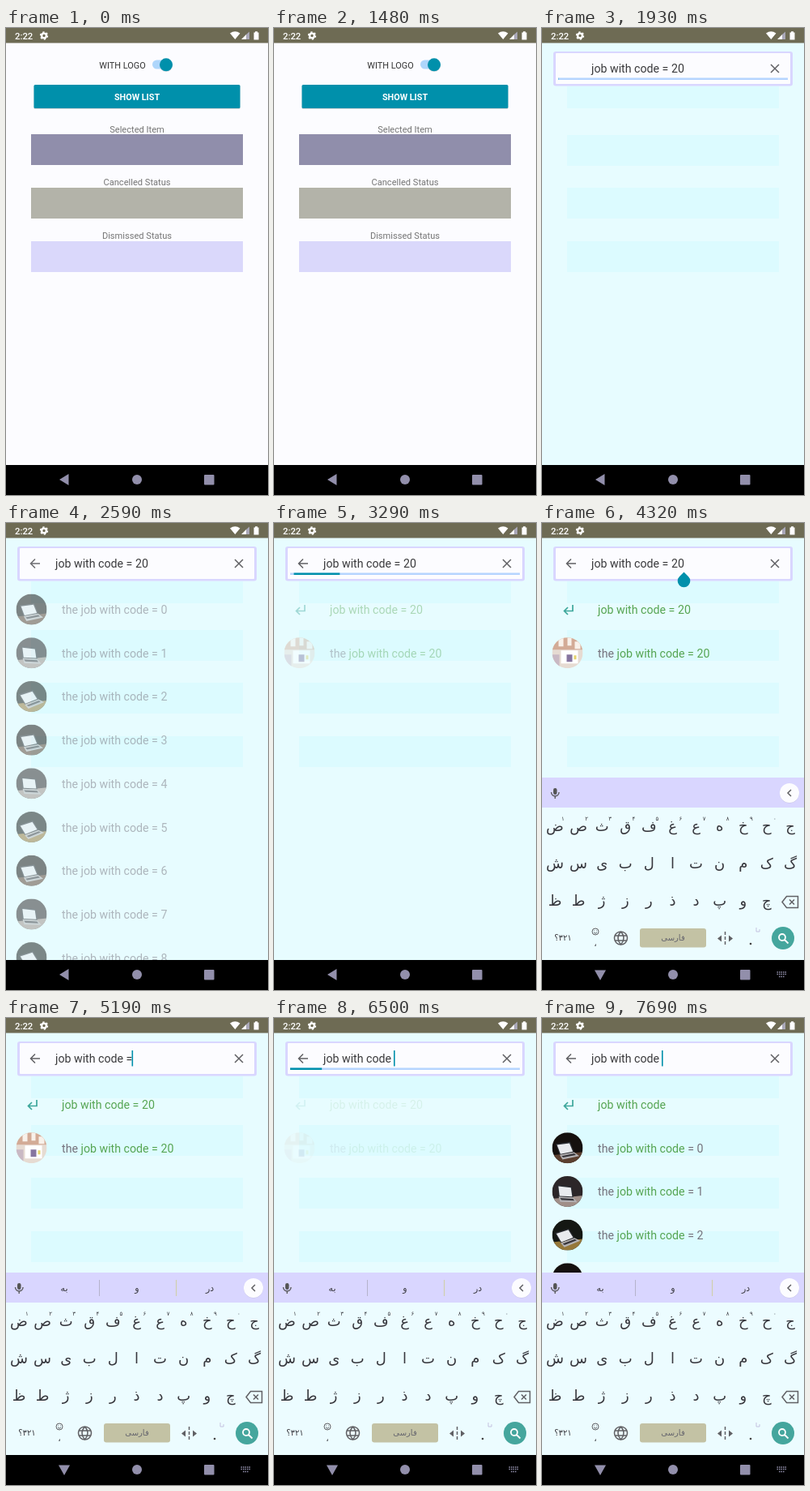
Animation of 324 by 576 pixels, one loop 8000 ms. Source, as an HTML page:

```html
<!DOCTYPE html>
<html lang="en">
<head>
<meta charset="utf-8">
<title>Search list dialog</title>
<style>
  html, body { margin: 0; width: 100%; height: 100%; overflow: hidden; background: #fcfcff; }
  svg { display: block; width: 100%; height: 100%; }
  text { font-family: Roboto, sans-serif; }
  .label { font-size: 11.1px; fill: #757575; text-anchor: middle; }
  .entry { font-size: 14.2px; fill: #75727c; }
  .entry .hit { fill: #56a552; }
  #query { font-size: 14.2px; fill: #3a3a3c; }
  #keyboard text { font-family: "DejaVu Sans", sans-serif; fill: #37373d; text-anchor: middle; }
  .line { fill: none; stroke: #606064; stroke-width: 1.5; }
</style>
</head>
<body>
<svg viewBox="0 0 324 576">
  <defs>
    <clipPath id="disc"><circle r="19"/></clipPath>
    <g id="desk" clip-path="url(#disc)">
      <rect x="-19" y="-19" width="38" height="38" fill="#e6dbd2"/>
      <path d="M-19-19H19V-4H-19z" fill="#d3ab96"/>
      <path d="M-11-19H-5V-8H-11zM0-19H5V-9H0zM9-14H16V-5H9z" fill="#f8f1ea"/>
      <path d="M-8-3H13V13H-8z" fill="#fff"/>
      <path d="M-19 2H-10V19H-19z" fill="#c9b9c4"/>
      <path d="M-1 2H6V11H-1z" fill="#86759f"/>
      <path d="M8 3H11V8H8z" fill="#e5d36d"/>
    </g>
  </defs>

  <g id="home">
    <rect width="324" height="576" fill="#fcfcff"/>
    <text class="label" x="144" y="50" style="font-size:10.9px;fill:#333">WITH LOGO</text>
    <rect x="181" y="39.500" width="25" height="11" rx="5.500" fill="#aed6fb"/>
    <circle cx="198" cy="46" r="8" fill="#9aa6b0" opacity=".4"/>
    <circle cx="198" cy="45.300" r="8" fill="#0090ab"/>
    <rect x="34.500" y="71" width="255" height="29" rx="1.500" fill="#aaa" opacity=".5"/>
    <rect x="34.500" y="70" width="255" height="29" rx="1.500" fill="#0090ab"/>
    <text class="label" x="162" y="89" style="font-size:10.8px;font-weight:700;fill:#fff">SHOW LIST</text>
    <text class="label" x="162" y="128.500">Selected Item</text>
    <rect x="31" y="131" width="262" height="38" fill="#908eab"/>
    <text class="label" x="162" y="194">Cancelled Status</text>
    <rect x="31" y="197" width="262" height="38" fill="#b3b3a9"/>
    <text class="label" x="162" y="260">Dismissed Status</text>
    <rect x="31" y="263" width="262" height="38" fill="#dad8fb"/>
  </g>

  <g id="dialog">
    <rect y="18" width="324" height="521" fill="#e7fcff"/>
    <path d="M31 72H293V99H31zM31 132H293V170H31zM31 197H293V235H31zM31 263H293V301H31z" fill="#dcfbff"/>
    <g id="allItems"></g>
    <g id="oneItem"></g>
    <g id="someItems"></g>
    <rect x="14" y="29" width="296" height="42.500" rx="3" fill="#d9d6ff"/>
    <rect x="17" y="31" width="290" height="38" rx="1" fill="#fcfcff"/>
    <path id="back" class="line" d="M42 50H31M36 44.500L30.500 50L36 55.500"/>
    <path class="line" d="M283 45L293 55M293 45L283 55"/>
    <text id="query" x="61" y="55"></text>
    <g id="progress">
      <rect x="20" y="61.500" width="284" height="2.500" fill="#b6d5ff"/>
      <rect id="bar" y="61.500" height="2.500" fill="#0090ab"/>
    </g>
    <rect id="caret" y="40" width="1.600" height="19.500" fill="#0090ab"/>
    <path id="handle" d="M175.500 60.500L181 66A7.800 7.800 0 1 1 170 66z" fill="#0090ab"/>
  </g>

  <g id="keyboard">
    <rect y="314" width="324" height="262" fill="#ecfcff"/>
    <rect y="314" width="324" height="37" fill="#d9d6ff"/>
    <rect x="14" y="327" width="4.500" height="8" rx="2.200" fill="#555"/>
    <path d="M11.500 332A4.700 4.700 0 0 0 21 332M16.200 337V340" class="line"/>
    <circle cx="306" cy="333.500" r="12" fill="#c4c1e4"/>
    <circle cx="306" cy="333" r="12" fill="#fcfcff"/>
    <path class="line" d="M308 329L304 333L308 337"/>
    <g id="suggestions" font-size="11">
      <text x="72" y="337">به</text><text x="162" y="337">و</text><text x="252" y="337">در</text>
      <path d="M115.500 323V343" stroke="#b5b3cc"/><path d="M210.500 323V343" stroke="#cfcfa5"/>
    </g>
    <g id="keys"></g>
    <path class="line" d="M297 467.500L302.500 460.500H316.500V474.500H302.500zM306 464.500L312 470.500M312 464.500L306 470.500"/>
    <text x="26" y="515" font-size="10" direction="rtl">۳۲۱؟</text>
    <circle class="line" cx="66" cy="504" r="4" style="stroke-width:1"/>
    <path class="line" d="M64 505Q66 507.500 68 505M64.500 502.500V503.300M67.500 502.500V503.300" style="stroke-width:1"/>
    <text x="66" y="522" font-size="11">،</text>
    <path class="line" d="M89.500 512A8 8 0 1 0 105.500 512A8 8 0 1 0 89.500 512M90.500 509H104.500M90.500 515H104.500M97.500 504Q90.500 512 97.500 520Q104.500 512 97.500 504"/>
    <rect x="121" y="500" width="82" height="23.500" rx="3" fill="#c3c2a4"/>
    <text x="162" y="515" font-size="10" style="fill:#66666e">فارسی</text>
    <path class="line" d="M226.500 504V521" stroke-dasharray="4 2"/>
    <path d="M217 512.500L222 508.500V516.500zM236 512.500L231 508.500V516.500z" fill="#606064"/>
    <circle cx="258" cy="519" r="1.300" fill="#444"/>
    <path d="M265 499V504H269V501" fill="none" stroke="#c4c2e0"/>
    <circle cx="298" cy="512" r="14" fill="#45a69d"/>
    <path d="M293 511A4 4 0 1 1 301 511A4 4 0 1 1 293 511M300 514L304.500 518.500" fill="none" stroke="#fff" stroke-width="1.800"/>
  </g>

  <g id="systemBars">
    <rect width="324" height="18.500" fill="#6e6b54"/>
    <text x="11" y="13.500" style="font-size:11.3px;font-weight:500;fill:#fff">2:22</text>
    <circle cx="47" cy="9.500" r="2.900" fill="none" stroke="#fff" stroke-width="2.400"/>
    <circle cx="47" cy="9.500" r="4.500" fill="none" stroke="#fff" stroke-width="1.400" stroke-dasharray="2.350 2.350"/>
    <path d="M277 6.500Q283.300 2 289.500 6.500L283.300 14zM291 14L297 8V14z" fill="#fff"/>
    <path d="M297 14V8L301 4.500V14z" fill="#aaa8b8"/>
    <path d="M306.500 5.500H308V4.300H311V5.500H312.500V14.500H306.500z" fill="#fff"/>
    <rect y="539" width="324" height="37"/>
    <g fill="#928fab">
      <path id="navBack" d="M66 557L77.500 550V564z"/>
      <path id="navDown" d="M65 551.500H79L72 564z"/>
      <circle cx="162" cy="557" r="6"/>
      <rect x="245" y="551" width="12.500" height="12.500" rx="1"/>
      <path id="navKeyboard" d="M290.500 554H302M290.500 556.500H302M293 559.500H300" stroke="#928fab" stroke-width="1.500" stroke-dasharray="1.500 1"/>
    </g>
  </g>
</svg>
<script>
const LOOP = 8000;
const el = id => document.getElementById(id);
const ramp = (t, from, to) => Math.min(1, Math.max(0, (t - from) / (to - from)));
const within = (t, from, to) => t >= from && t < to;
const show = (id, visible) => { el(id).style.visibility = visible ? "visible" : "hidden"; };
const fade = (id, opacity) => { el(id).style.opacity = opacity; show(id, opacity > 0); };

// List rows
const rowY = row => 107 + row * 53.7;
const entry = (row, html) => `<text class="entry" x="69" y="${Math.round(rowY(row) + 5)}">${html}</text>`;
const hit = text => `<tspan class="hit">${text}</tspan>`;
const at = (row, art) => `<g transform="translate(31.500 ${rowY(row) - .5})">${art}</g>`;

const laptop = n => `<g clip-path="url(#disc)">
  <rect x="-19" y="-19" width="38" height="38" fill="${["#15100e", "#2c2628", "#141713"][n % 3]}"/>
  <path d="M-19 9L19 5V19H-19z" fill="${["#5c4030", "#a08f88", "#96783a"][n % 3]}"/>
  <g transform="translate(-1 2) rotate(${[-4, 10, -14][n % 3]})">
    <path d="M-13-8L5-9L9 4L-9 6z" fill="#292b30"/>
    <path d="M-11.500-6.500L4-7.500L7.500 3L-8 5z" fill="#e9ebee"/>
    <path d="M-9 6L9 4L15 9L-6 12z" fill="#b4b2b4"/>
    <path d="M-7 7.500L9 5.500L11 7.500L-5 9.500z" fill="#37353a"/>
  </g>
</g>`;

const queryRow = text => `<path d="M38 101V108.500H28M32 104L27.500 108.500L32 113"
  fill="none" stroke="#3ca69b" stroke-width="1.700"/>` + entry(0, hit(text));

el("allItems").innerHTML = [...Array(9).keys()]
  .map(n => at(n, laptop(n)) + entry(n, `the job with code = ${n}`)).join("");
el("oneItem").innerHTML = queryRow("job with code = 20")
  + at(1, '<use href="#desk"/>') + entry(1, "the " + hit("job with code = 20"));
el("someItems").innerHTML = queryRow("job with code") + [0, 1, 2, 3]
  .map(n => at(n + 1, laptop(n)) + entry(n + 1, `the ${hit("job with code")} = ${n}`)).join("");

// Keyboard letters
const keyText = (text, x, y, size) => `<text x="${x}" y="${y}" font-size="${size}">${text}</text>`;
const keyRow = (letters, x, y, size) =>
  [...letters].map((letter, i) => keyText(letter, x + i * 29.1, y, size)).join("");
el("keys").innerHTML = keyRow("ضصثقفغعهخحج", 16, 379.5, 18) + keyRow("شسیبلاتنمکگ", 16, 426, 18)
  + keyRow("ظطژزرذدپوچ", 16, 472, 18) + keyRow("۱۲۳۴۵۶۷۸۹۰", 26, 367, 7);

// Query text: start time, text, caret position
const edits = [
  [0, "job with code = 20", 175.5],
  [4770, "job with code = 2", 168],
  [4960, "job with code = ", 160],
  [5150, "job with code =", 156],
  [5720, "job with code", 148.5],
];
// Progress: visible from, bar starts, hidden at
const loads = [[1650, 1930, 2430], [3040, 3075, 3540], [6210, 6363, 7200]];

function drawProgress(t) {
  const load = loads.find(([from, , to]) => within(t, from, to));
  show("progress", load);
  if (!load) return;
  const elapsed = (Math.min(t, 6830) - load[1]) / 1000;
  const head = ramp(elapsed, 0, 1), tail = ramp(elapsed, .2, 1.2);
  el("bar").setAttribute("x", 20 + 284 * tail);
  el("bar").setAttribute("width", 284 * (head - tail));
}

function draw(t) {
  fade("dialog", ramp(t, 1650, 1900));
  fade("back", ramp(t, 2470, 2600));
  fade("allItems", ramp(t, 2470, 2710) * (1 - ramp(t, 3040, 3290)));
  fade("oneItem", ramp(t, 3170, 3460) * (1 - ramp(t, 6280, 6530)));
  fade("someItems", ramp(t, 6540, 6830));

  const [, text, caretX] = edits.findLast(([start]) => t >= start);
  el("query").textContent = text;
  el("caret").setAttribute("x", caretX - .5);
  show("caret", within(t, 3400, 4320) || within(t, 4770, 6720) || t >= 7690);
  show("handle", within(t, 3400, 4770));
  drawProgress(t);

  const typing = t >= 3330;
  const slide = 224 * (1 - ramp(t, 3330, 3670)) ** 3;
  el("keyboard").setAttribute("transform", `translate(0 ${slide})`);
  show("keyboard", typing);
  show("suggestions", t >= 4850);
  show("navBack", !typing);
  show("navDown", typing);
  show("navKeyboard", typing);
}

const begin = performance.now();
function tick() {
  draw((performance.now() - begin) % LOOP);
  requestAnimationFrame(tick);
}
tick();
</script>
</body>
</html>
```
